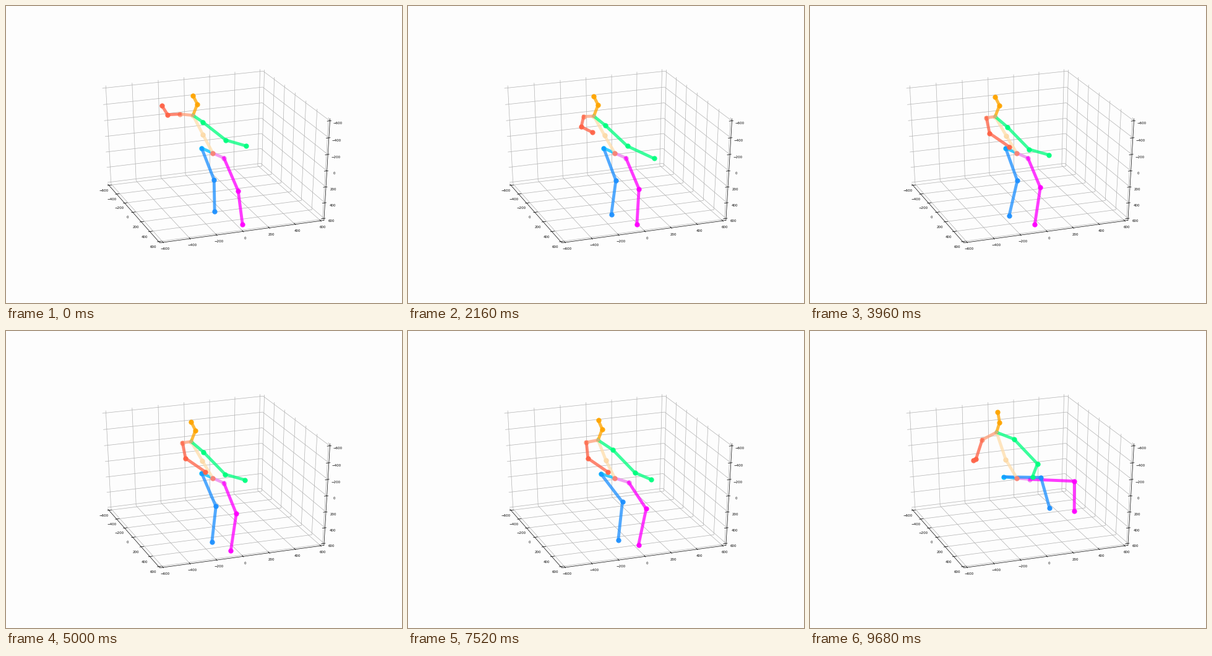
Recreate the animation shown at these times as a matplotlib script. Size 640 by 480 pixels, loop 9.72 s.

```python
import numpy as np
import matplotlib.pyplot as plt
from matplotlib.animation import FuncAnimation

W, H, DPI = 640, 480, 100
STEP, COUNT = 40, 243

fig = plt.figure(figsize=(W / DPI, H / DPI), dpi=DPI, facecolor="#fdfdfd")
ax = fig.add_axes([0, 0, 1, 1])
ax.set(xlim=(0, W), ylim=(H, 0))
ax.axis("off")

# Perspective camera around the unit cube, third coordinate pointing up.
CENTER, SCALE, DIST = (334.7, 237.9), (268.1, 178.7), 10
ELEV, TURN = np.radians(30), np.radians(20)
CE, SE, CT, ST = np.cos(ELEV), np.sin(ELEV), np.cos(TURN), np.sin(TURN)


def project(x, y, z):
    depth = 1 - (CE * (CT * y - ST * x) + SE * z) / DIST
    across = CT * x + ST * y
    up = SE * (ST * x - CT * y) + CE * z
    return CENTER[0] + SCALE[0] * across / depth, CENTER[1] - SCALE[1] * up / depth


def path(points, color, zorder):
    xs, ys = zip(*(project(*p) for p in points))
    ax.plot(xs, ys, color=color, lw=0.5, zorder=zorder)


def label(point, value):
    x, y = project(*point)
    ax.text(x, y, str(value).replace("-", "\u2212"), fontsize=4,
            family="DejaVu Sans", ha="center", va="top", zorder=3)


def draw_box():
    grid, ink = "#b0b0b0", "black"
    e = 0.5 + 1 / 48
    far = e + 0.0336
    inner, outer = e - 1 / 60, e + 1 / 120
    for value in range(-600, 601, 200):
        v = value / 1200
        path([(v, -e, e), (v, -e, -e), (v, e, -e)], grid, 1)
        path([(e, v, e), (e, v, -e), (-e, v, -e)], grid, 1)
        path([(-e, -e, v), (e, -e, v), (e, e, v)], grid, 1)
        path([(v, inner, -e), (v, outer, -e)], ink, 2)
        path([(-inner, v, -e), (-outer, v, -e)], ink, 2)
        path([(inner, e, v), (outer, e, v)], ink, 2)
        label((v, far, -far), value)
        label((-far, v, -far), value)
        label((far, far, -v), value)
    path([(-e, -e, -e), (-e, e, -e), (e, e, -e)], ink, 2)
    path([(e, e, -e), (e, e, e)], ink, 2)


GREEN, BLUE, PINK = "springgreen", "dodgerblue", "magenta"
RED, CREAM, AMBER = "tomato", "navajowhite", "orange"

# Parent, joint, colour and standing offset (x + y*1j, in pixels), back to front.
BONES = [
    ("root", "l_hip", "violet", 18 + 8j),
    ("l_hip", "l_knee", PINK, 20 + 50j),
    ("l_knee", "l_ankle", PINK, -9 + 60j),
    ("root", "r_hip", "deepskyblue", -18 - 8j),
    ("r_hip", "r_knee", BLUE, 24 + 54j),
    ("r_knee", "r_ankle", BLUE, -5 + 58j),
    ("root", "spine", CREAM, -17 - 28j),
    ("spine", "neck", CREAM, -18 - 31j),
    ("neck", "chin", AMBER, 7 - 18j),
    ("chin", "head", AMBER, -7 - 14j),
    ("neck", "l_shoulder", GREEN, 20 + 17j),
    ("l_shoulder", "l_elbow", GREEN, 35 + 36j),
    ("l_elbow", "l_wrist", GREEN, 32 + 9j),
    ("neck", "r_shoulder", "lightsalmon", -14 + 2j),
    ("r_shoulder", "r_elbow", RED, 5 + 25j),
    ("r_elbow", "r_wrist", RED, 32 + 22j),
]

clock = np.arange(COUNT) * STEP / 1000


def ramp(start, end):
    s = np.clip((clock - start) / (end - start), 0, 1)
    return s * s * (3 - 2 * s)


def pulse(mid, width):
    return np.exp(-((clock - mid) / width) ** 2)


sit = ramp(6.8, 9.68)

# Each movement: its strength over time and how far it bends each bone.
MOVES = [
    # right arm comes down from the raised start
    (1 - ramp(0, 3.6), dict(
        spine=1 - 2j, neck=2, l_shoulder=-4 - 6j, l_elbow=2 - 7j,
        r_shoulder=-7 - 4j, r_elbow=-25 - 24j, r_wrist=-40 - 37j,
        l_knee=3 + 3j, l_ankle=16 - 6j, r_knee=-4 - 3j, r_ankle=6 - 7j)),
    # both hands sweep outwards
    (pulse(0.85, 0.5), dict(r_wrist=-23 + 4j)),
    (pulse(1.6, 0.8), dict(l_wrist=18 + 18j)),
    # step back
    (pulse(3.3, 1.2), dict(l_knee=-3j, r_knee=-7 - 2j, r_ankle=-11 - 2j)),
    # lean forward while the body turns
    (pulse(8.1, 0.8), dict(
        spine=5, neck=8, l_hip=7, r_hip=-7, l_shoulder=5, r_shoulder=-6,
        r_knee=9, l_ankle=-8, r_ankle=-8 + 8j)),
    # sit down
    (sit, dict(
        spine=-1 - 2j, neck=3 - 13j, chin=-2 + 2j, head=4 - 3j,
        l_shoulder=8 - 6j, l_elbow=3 + 4j, l_wrist=-40 + 12j,
        r_shoulder=-9 + 10j, r_elbow=-15 + 6j, l_hip=3 - 6j, r_hip=-3 + 6j,
        l_knee=52 - 47j, l_ankle=9 - 12j, r_knee=36 - 53j, r_ankle=19 - 9j)),
    (sit ** 3, dict(r_wrist=-36 - 20j)),
]

tracks = {"root": np.full(COUNT, 334.2 + 237.7j)}
for parent, joint, _, rest in BONES:
    bend = sum(strength * move.get(joint, 0) for strength, move in MOVES)
    tracks[joint] = tracks[parent] + rest + bend

TINTS = dict(r_shoulder="#f9a083", spine="#fad7a6", neck="#fcdcb0")


def add_dot(color, zorder):
    return ax.plot([], [], "o", color=color, ms=6, mew=0, alpha=0.93,
                   snap=False, zorder=zorder)[0]


draw_box()
lines, dots = [], {"root": add_dot("salmon", 16.6)}
for z, (parent, joint, color, _) in enumerate(BONES, start=10):
    lines.append(ax.plot([], [], color=color, lw=3.5, alpha=0.77,
                         snap=False, zorder=z)[0])
    dots[joint] = add_dot(TINTS.get(joint, color), z + 0.5)


def update(i):
    for line, (parent, joint, *_) in zip(lines, BONES):
        ends = np.array([tracks[parent][i], tracks[joint][i]])
        line.set_data(ends.real, ends.imag)
    for joint, dot in dots.items():
        spot = tracks[joint][i]
        dot.set_data([spot.real], [spot.imag])
    return [*lines, *dots.values()]


anim = FuncAnimation(fig, update, frames=COUNT, interval=STEP, repeat=True, repeat_delay=0)
plt.show()
```
